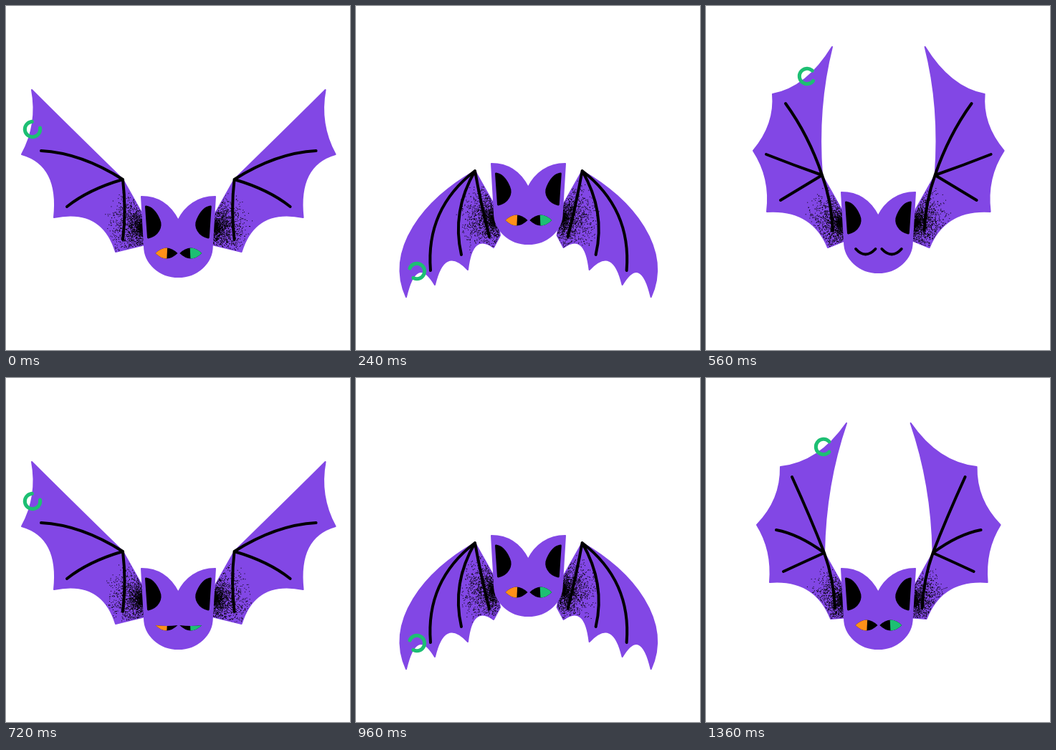
An HTML page with a canvas for the animation above (1440 ms loop, 480 px wide and 480 px high).

```html
<!DOCTYPE html>
<html lang="en">
<head>
<meta charset="utf-8">
<title>Flapping bat</title>
<style>
html, body { margin: 0; width: 100%; height: 100%; overflow: hidden; background: #fff; }
canvas { display: block; width: 480px; height: 480px; }
</style>
</head>
<body>
<canvas id="stage" width="480" height="480"></canvas>
<script>
const ctx = document.getElementById('stage').getContext('2d');
const PURPLE = '#8247e5', GREEN = '#1dbf73', ORANGE = '#ff9018', BLACK = '#000';
const STEP = 80, STEPS = 18, FLAP = 9;

// Left wing: shoulder, two leading-edge handles, tip, then handle/corner pairs
// along the trailing edge, handle/end pairs of the three bones, ring centre.
const pose = (head, gap, points) => ({ head, gap, points });
const spread = pose(0, -52, [
  [163, 242], [121, 201], [79, 160], [36, 117],
  [45, 165], [22, 207], [75, 222], [67, 295], [134, 281], [153, 343],
  [105, 205], [49, 202], [115, 256], [85, 280], [168, 285], [163, 326], [37, 172]]);
const lowered = pose(-46, -200, [
  [166, 230], [95, 270], [40, 340], [70, 406],
  [84, 346], [110, 389], [123, 333], [156, 368], [162, 315], [192, 337],
  [97, 283], [104, 369], [133, 287], [147, 347], [174, 275], [186, 322], [85, 370]]);
const raised = pose(-6, -5, [
  [162, 236], [157, 172], [162, 112], [176, 57],
  [141, 114], [93, 123], [97, 165], [66, 202], [91, 240], [85, 287],
  [143, 180], [111, 136], [122, 222], [84, 207], [132, 254], [104, 271], [141, 98]]);
const closing = pose(0, 0, [
  [165, 244], [166, 181], [176, 121], [196, 63],
  [158, 118], [104, 124], [105, 170], [71, 205], [93, 240], [89, 285],
  [146, 195], [120, 138], [130, 218], [98, 212], [136, 257], [108, 270], [164, 96]]);
// The upright wings carry one more scallop before the body.
for (const [p, handle, corner] of [[raised, [148, 283], [170, 337]], [closing, [152, 280], [174, 336]]]) {
  p.points.splice(10, 0, handle, corner);
  p.extra = 1;
}

const lerp = (a, b, t) => a + (b - a) * t;
const mix = (a, b, t) => [lerp(a[0], b[0], t), lerp(a[1], b[1], t)];

// Swing around the shoulder, halfway between a straight and a circular path.
function swing(a, b, t) {
  const origin = mix(a.points[0], b.points[0], t);
  const polar = (p, o) => [Math.hypot(p[0] - o[0], p[1] - o[1]), Math.atan2(p[1] - o[1], o[0] - p[0])];
  const points = a.points.map((p, i) => {
    if (!i) return origin;
    const [r, angle] = mix(polar(p, a.points[0]), polar(b.points[i], b.points[0]), t);
    const arc = [origin[0] - r * Math.cos(angle), origin[1] + r * Math.sin(angle)];
    return mix(mix(p, b.points[i], t), arc, 0.5);
  });
  return pose(lerp(a.head, b.head, t), lerp(a.gap, b.gap, t), points);
}

const rising = pose(-22, -52, spread.points.map(([x, y]) => [x, y - 8.7]));
const poses = [
  spread, swing(spread, lowered, 1 / 3), swing(spread, lowered, 2 / 3),
  lowered, swing(lowered, rising, 1 / 3), swing(lowered, rising, 2 / 3),
  rising, raised, closing];

function randomFrom(seed) {
  return () => (seed = (seed * 16807) % 2147483647) / 2147483647;
}

const quad = (c, p) => ctx.quadraticCurveTo(...c, ...p);

function stroke(color, width) {
  ctx.strokeStyle = color;
  ctx.lineWidth = width;
  ctx.lineCap = ctx.lineJoin = 'round';
  ctx.stroke();
}

function grain(x, y, seed) {
  const random = randomFrom(seed);
  ctx.fillStyle = BLACK;
  for (let i = 0; i < 3200; i++) {
    const r = 55 * Math.abs(random() + random() - 1);
    const a = random() * Math.PI * 2;
    ctx.fillRect(x + r * Math.cos(a), y + r * Math.sin(a) * 1.1, 1, 1);
  }
}

function drawWing({ points, extra }, seed) {
  const last = extra ? 11 : 9;
  const [x, y] = points[0];
  ctx.beginPath();
  ctx.moveTo(x, y);
  ctx.bezierCurveTo(...points[1], ...points[2], ...points[3]);
  for (let i = 4; i < last; i += 2) quad(points[i], points[i + 1]);
  ctx.lineTo(x + 35, y + 90);
  ctx.lineTo(x + 27, y + 48);
  ctx.closePath();
  ctx.fillStyle = PURPLE;
  ctx.fill();
  stroke(PURPLE, 2);
  ctx.save();
  ctx.clip();
  grain(x + 27, y + 66, seed);
  ctx.restore();

  ctx.beginPath();
  for (let i = last + 1; i < last + 7; i += 2) {
    ctx.moveTo(x, y);
    quad(points[i], points[i + 1]);
  }
  if (extra) {
    ctx.moveTo(x, y);
    ctx.quadraticCurveTo(x + 13, y + 36, x + 15, y + 77);
  }
  stroke(BLACK, 4);
}

function mirrored(center, draw) {
  draw(false);
  ctx.save();
  ctx.translate(center * 2, 0);
  ctx.scale(-1, 1);
  draw(true);
  ctx.restore();
}

function drawRing({ points, gap }) {
  const rad = Math.PI / 180;
  ctx.beginPath();
  ctx.arc(...points[points.length - 1], 10.7, (gap + 42) * rad, (gap + 318) * rad);
  stroke(GREEN, 5);
}

function drawEye(color, lid) {
  ctx.beginPath();
  if (lid === 'closed') {
    ctx.moveTo(209, 345);
    ctx.quadraticCurveTo(222.5, 360, 236.5, 345);
    stroke(BLACK, 3.8);
    return;
  }
  ctx.moveTo(208.5, 345);
  ctx.quadraticCurveTo(224, lid === 'half' ? 347 : 330, 239.5, 345);
  ctx.quadraticCurveTo(224, 360, 208.5, 345);
  ctx.save();
  ctx.clip();
  ctx.fillStyle = BLACK;
  ctx.fillRect(205, 330, 40, 30);
  ctx.fillStyle = color;
  ctx.beginPath();
  ctx.moveTo(205, 330);
  ctx.lineTo(225.5, 330);
  ctx.lineTo(224, 360);
  ctx.lineTo(205, 360);
  ctx.fill();
  ctx.restore();
}

function drawHead(dy, lid) {
  ctx.save();
  ctx.translate(0, dy);
  ctx.beginPath();
  ctx.moveTo(240.2, 299);
  ctx.bezierCurveTo(230, 279, 213, 266, 189, 266);
  ctx.lineTo(193, 335);
  ctx.ellipse(240.4, 335, 47.4, 43, 0, Math.PI, 0, true);
  ctx.lineTo(292, 266);
  ctx.bezierCurveTo(268, 266, 250, 279, 240.2, 299);
  ctx.fillStyle = PURPLE;
  ctx.fill();
  stroke(PURPLE, 2);
  mirrored(240.4, () => {
    ctx.beginPath();
    ctx.moveTo(195.5, 280);
    ctx.lineTo(198.5, 323);
    ctx.bezierCurveTo(212, 320, 218, 308, 213.5, 298);
    ctx.bezierCurveTo(209, 288, 203, 281, 195.5, 280);
    ctx.fillStyle = BLACK;
    ctx.fill();
    stroke(BLACK, 3);
  });
  mirrored(240.9, right => drawEye(right ? GREEN : ORANGE, lid));
  ctx.restore();
}

const lids = { 6: 'half', 7: 'closed', 8: 'closed', 9: 'half' };
let shown = -1;

function draw() {
  const step = Math.floor(performance.now() / STEP) % STEPS;
  if (step !== shown) {
    shown = step;
    const current = poses[step % FLAP];
    ctx.fillStyle = '#fff';
    ctx.fillRect(0, 0, 480, 480);
    mirrored(240.8, right => drawWing(current, 71 + step * 997 + (right ? 5003 : 0)));
    drawRing(current);
    drawHead(current.head, lids[step]);
  }
  requestAnimationFrame(draw);
}
draw();
</script>
</body>
</html>
```
